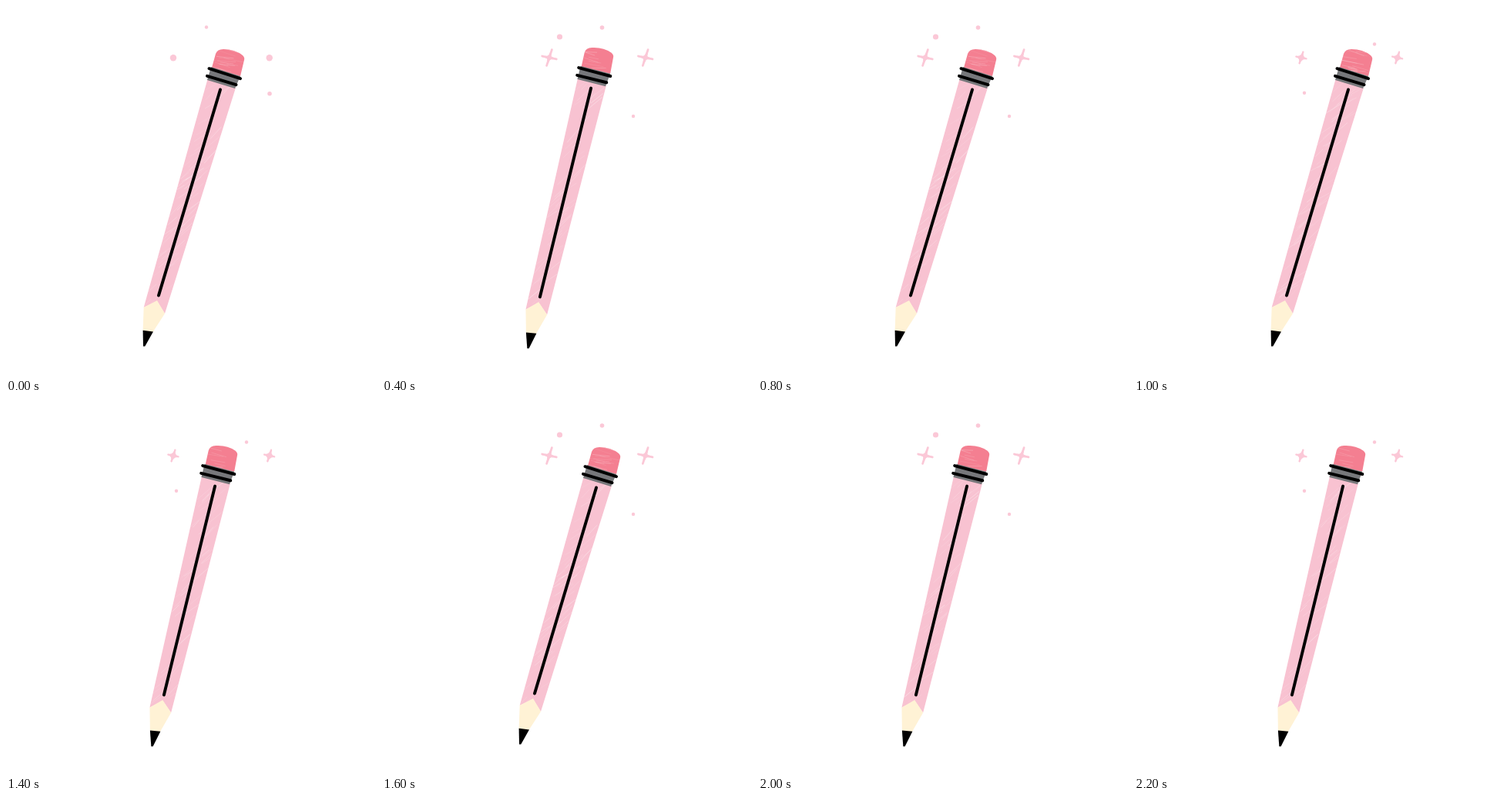
Animation of 480 by 480 pixels, one loop 2.4 s. Source, as an HTML page:

```html
<!DOCTYPE html>
<html lang="en">
<head>
<meta charset="utf-8">
<title>Sparkling pencil</title>
<style>
  html, body { margin: 0; width: 100%; height: 100%; overflow: hidden; background: #fff; }
  svg { display: block; width: 100vw; height: 100vh; }
</style>
</head>
<body>
<svg viewBox="0 0 480 480">
  <defs>
    <clipPath id="bodyClip"><path id="body" d="M261.5 95L298 106L206 399L196 383L178.7 391Z"/></clipPath>
    <clipPath id="eraserClip"><path id="eraser" d="M267 80L272 62Q274 56 282 56Q297 56 307 64Q310 67 309 70L304 91Z"/></clipPath>
  </defs>
  <g id="pencil">
    <use href="#body" fill="#f8c2d1"/>
    <g id="bodyGrain" clip-path="url(#bodyClip)" stroke="#fff"></g>
    <use href="#eraser" fill="#f47f91"/>
    <g id="eraserGrain" clip-path="url(#eraserClip)" stroke="#fff"></g>
    <path d="M266 79L304 91L297 107L261 96Z" fill="#77787b"/>
    <path d="M178.7 391L196 382L206 399L190.5 423L177.6 421Z" fill="#fff2d5"/>
    <path d="M177.6 420.7L191 422.5L180.3 441.5H178Z"/>
    <path d="M263.5 81.2L304 94.2M261 90.8L298.5 102.2M278 108.5L198 375.5"
          stroke="#000" stroke-width="4" stroke-linecap="round"/>
  </g>
  <g id="sparkles" fill="#fbc8d7" stroke="#fbc8d7" stroke-linecap="round" stroke-linejoin="round"></g>
</svg>
<script>
const STEP = 200, STEPS = 12;
const el = id => document.getElementById(id);
const polar = (length, degrees) => {
  const a = degrees * Math.PI / 180;
  return [length * Math.cos(a), length * Math.sin(a)];
};

function seeded(seed) {
  return () => {
    seed = (seed * 16807) % 2147483647;
    return seed / 2147483647;
  };
}

// Faint pale streaks; place() picks a centre, angle is the steepest tilt
function grain(seed, count, angle, place) {
  const rnd = seeded(seed);
  return Array.from({ length: count }, () => {
    const [x, y] = place(rnd);
    const [dx, dy] = polar(6 + rnd() * 10, angle + rnd() * 20);
    return `<path d="M${x - dx} ${y - dy}L${x + dx} ${y + dy}" stroke-width="${0.5 + rnd() * 0.5}" opacity="${0.12 + rnd() * 0.2}"/>`;
  }).join('');
}

function onBody(rnd) {
  const y = 100 + rnd() * 285;
  return [280 - (y - 100) * 0.3 + (rnd() - 0.5) * 28, y];
}

const onEraser = rnd => [276 + rnd() * 24, 58 + rnd() * 28];

// A four-armed star whose arms lengthen and thin out with each stage
function star(cx, cy, stage) {
  const reach = 7.2 * 1.41 ** (stage - 1);
  const up = polar(reach * 1.08, -72), side = polar(reach * 0.93, 12);
  const flip = ([x, y]) => [-x, -y];
  const tips = [up, side, flip(up), flip(side)];
  const core = tips.map(([x, y]) => `${x / stage} ${y / stage}`);
  return `<g transform="translate(${cx} ${cy})" stroke-width="${3.6 - 1.6 / stage}">
    <path d="${tips.map(tip => `M0 0L${tip}`).join('')}"/>
    <path d="M${core.join('Q0 0 ')}Q0 0 ${core[0]}Z"/>
  </g>`;
}

const dot = ([x, y, r]) => `<circle cx="${x}" cy="${y}" r="${r}" stroke="none"/>`;

const dots = [
  [[260, 27.5, 2.2], [342, 113.7, 2.8]],
  [[312, 49.5, 2.2], [221, 112.7, 2.2]],
  [[230.5, 40, 3.6], [285.5, 28, 2.8], [326, 143, 2.2]],
  [[205.2, 94.5, 2.8], [319.8, 35.3, 2.8], [341.8, 131.3, 3.8]]
];

function sparkles(stage) {
  const centres = [217, 341.7].map(x => stage ? star(x, 67, stage) : dot([x, 67.2, 4.2]));
  return centres.join('') + dots[stage].map(dot).join('');
}

let shown = -1;

function draw(ms) {
  const step = Math.floor(ms / STEP) % STEPS;
  if (step === shown) return;
  shown = step;
  const tilted = step % 4 > 1;
  // Shading is redrawn on each even step of a tilt, and lighter when tilted
  const look = step % 4;
  el('pencil').setAttribute('transform', tilted ? 'rotate(-2.95 238 242)' : '');
  el('bodyGrain').innerHTML = grain(4711 + look * 997, 80 - look * 10, -48, onBody);
  el('eraserGrain').innerHTML = grain(911 + look * 313, tilted ? 7 : 14, 2, onEraser);
  // Sparkles grow for three steps, then shrink for three
  el('sparkles').innerHTML = sparkles(3 - Math.abs(step % 6 - 3));
}

const start = performance.now();
function tick() {
  draw(performance.now() - start);
  requestAnimationFrame(tick);
}
tick();
</script>
</body>
</html>
```
